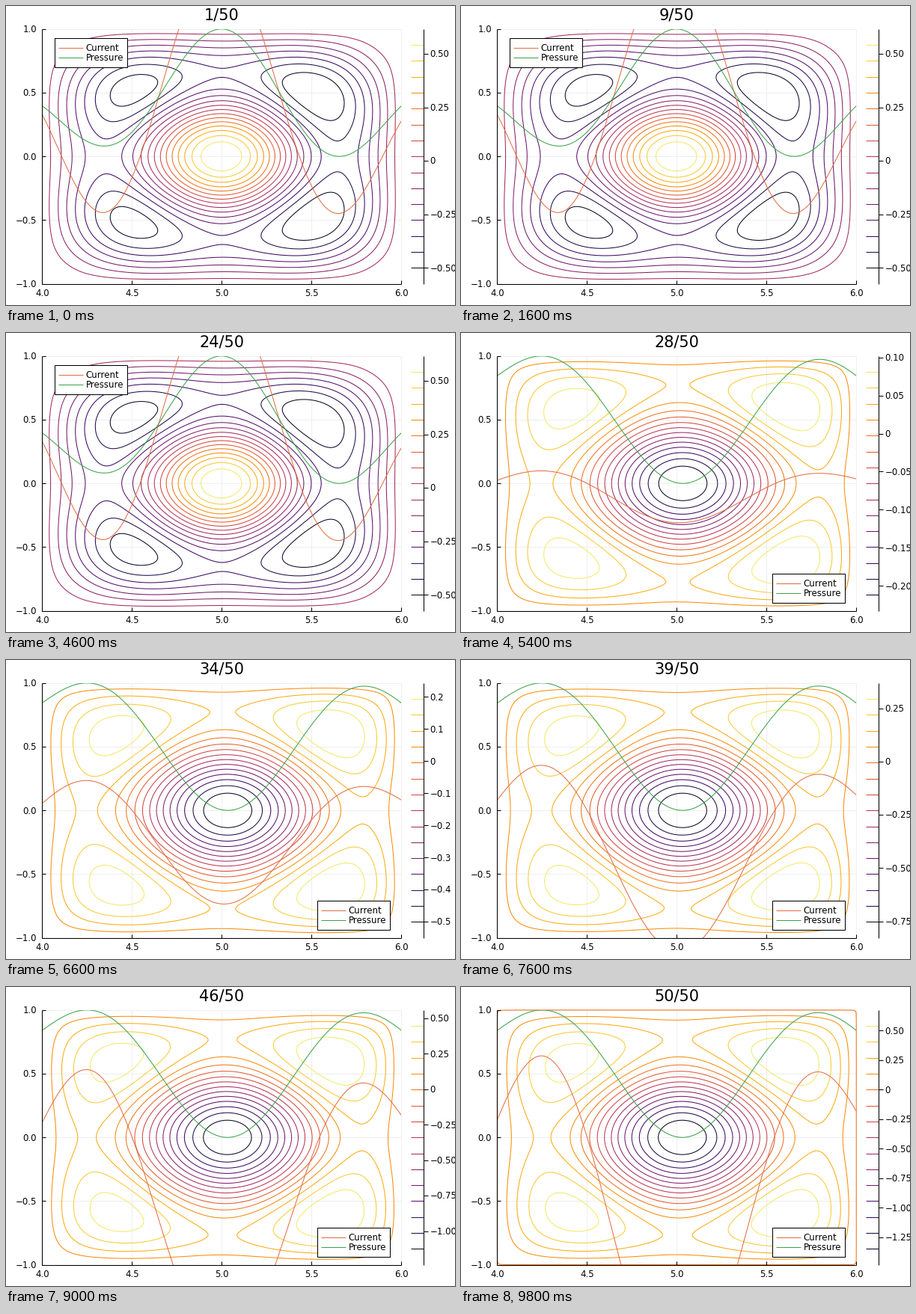
Write a matplotlib script that moves like this. It is 600x400 px and loops after 10 s.

```python
import math

import matplotlib.pyplot as plt
import numpy as np
from matplotlib.animation import FuncAnimation
from matplotlib.patches import Rectangle

FRAMES = 50
SWITCH = 25          # first step of the second equilibrium family
LEFT, RIGHT, TOP, BOTTOM = 48.3, 528.3, 30.8, 371.6
MID = (TOP + BOTTOM) / 2
HAIR = 0.75
SMALL, LARGE = 8.5, 15
ORANGE, GREEN = "#e26f46", "#3da44d"
LEVELS = 15
MU = 3.04

plt.rcParams["font.family"] = "DejaVu Sans"
fig = plt.figure(figsize=(6, 4), dpi=100, facecolor="white")
ax = fig.add_axes([0, 0, 1, 1])

R = np.linspace(4, 6, 161)
Z = np.linspace(-1, 1, 161)
H = R[1] - R[0]
INNER = R[1:-1]
ORDERS = np.arange(1, 40, 2)
WAVES = ORDERS * math.pi / 2
WEIGHTS = 4 / (ORDERS * math.pi) * np.sin(WAVES)
EYE = np.eye(len(INNER))
# psi'' - psi'/R on the inner grid points
BASE = (
    -2 / H**2 * EYE
    + np.diag(1 / H**2 - 1 / (2 * H * INNER[:-1]), 1)
    + np.diag(1 / H**2 + 1 / (2 * H * INNER[1:]), -1)
)


def px(r):
    return LEFT + (r - 4) / 2 * (RIGHT - LEFT)


def py(z):
    return MID - z * (BOTTOM - TOP) / 2


def parameters(step):
    """Eigenvalue and source profile of the linear Grad-Shafranov equation."""
    if step < SWITCH:
        return 31.02, 0.0535 * R**2 + 3.16
    return 22.3 + 0.0125 * (step - 34), 0.0039 * (step - 23.4) * R**2


def solve(lam, source):
    """Flux with zero boundary values, expanded in cosines along Z."""
    ops = BASE + (lam - WAVES**2)[:, None, None] * EYE
    rhs = -WEIGHTS[:, None] * source[1:-1]
    modes = np.linalg.solve(ops, rhs[..., None])[..., 0]
    psi = np.zeros((len(Z), len(R)))
    psi[1:-1, 1:-1] = (np.cos(np.outer(Z, WAVES)) @ modes)[1:-1]
    return psi


def nice_ticks(lo, hi):
    best, choice = -9, None
    for power in range(-4, 2):
        for base, nice in ((2.5, 0.501), (1, 1), (5, 0.9), (2, 0.7)):
            step = base * 10.0**power
            first, last = math.ceil(lo / step), math.floor(hi / step)
            count = last - first + 1
            if not 4 <= count <= 9:
                continue
            score = nice - abs(count - 5) / 5 - (count in (4, 9))
            if score > best:
                best, choice = score, (step, first, last)
    step, first, last = choice
    text = f"{step:.6f}".rstrip("0")
    digits = len(text.split(".")[1])
    return [(k * step, label(k * step, digits) if k else "0")
            for k in range(first, last + 1)]


def label(value, digits):
    return f"{value:.{digits}f}".replace("-", "\u2212")


def line(xs, ys, color="black", z=5, width=HAIR):
    return ax.plot(xs, ys, color=color, lw=width, zorder=z,
                   solid_capstyle="butt")[0]


def write(x, y, text, ha, size=SMALL):
    ax.text(x, y, text, ha=ha, va="baseline", fontsize=size,
            color="black", zorder=9)


def draw_axes():
    for r in (4, 4.5, 5, 5.5, 6):
        x = px(r)
        line([x, x], [TOP, BOTTOM], "#efefef", 1)
        line([x, x], [BOTTOM, BOTTOM - 5])
        write(x, 388, label(r, 1), "center")
    for z in (-1, -0.5, 0, 0.5, 1):
        y = py(z)
        line([LEFT, RIGHT], [y, y], "#efefef", 1)
        line([LEFT, LEFT + 5], [y, y])
        write(41, y + 4.3, label(z, 1), "right")
    line([LEFT, LEFT], [TOP, BOTTOM])
    line([LEFT, RIGHT], [BOTTOM, BOTTOM])


def draw_colorbar(levels, lo, hi):
    def at(v):
        return BOTTOM - (v - lo) / (hi - lo) * (BOTTOM - TOP)

    for v in levels:
        line([540.5, 558], [at(v)] * 2, plt.cm.inferno((v - lo) / (hi - lo)), 4)
    line([558.3, 558.3], [TOP, BOTTOM])
    for v, text in nice_ticks(lo, hi):
        line([558.3, 564], [at(v)] * 2)
        write(566.3, at(v) + 4.3, text, "left")


def draw_legend(x, y):
    ax.add_patch(Rectangle((x, y), 97, 39, fc="white", ec="black",
                           lw=HAIR, zorder=6))
    for k, (text, color) in enumerate((("Current", ORANGE),
                                       ("Pressure", GREEN))):
        row = y + 13.3 + 13 * k
        line([x + 5, x + 38], [row, row], color, 7)
        write(x + 42, row + 4.3, text, "left")


def draw(index):
    step = index + 1
    lam, source = parameters(step)
    psi = solve(lam, source)
    lo, hi = psi.min(), psi.max()
    levels = np.linspace(lo, hi, LEVELS + 2)[1:-1]
    mid = psi[len(Z) // 2]
    pressure = (mid - mid.min()) / (mid.max() - mid.min())
    current = (lam * mid + source) / (MU * R)

    ax.clear()
    ax.axis("off")
    draw_axes()
    ax.contour(px(R), py(Z), psi, levels=levels, cmap="inferno", vmin=lo,
               vmax=hi, linewidths=HAIR, linestyles="solid", zorder=3)
    frame = Rectangle((LEFT, TOP), RIGHT - LEFT, BOTTOM - TOP,
                      transform=ax.transData)
    for values, color in ((current, ORANGE), (pressure, GREEN)):
        line(px(R), py(values), color, 4).set_clip_path(frame)
    draw_colorbar(levels, lo, hi)
    draw_legend(*((64.5, 42.5) if step < SWITCH else (415.5, 321.5)))
    write(288.3, 18.5, f"{step}/{FRAMES}", "center", LARGE)
    ax.set_xlim(0, 600)
    ax.set_ylim(400, 0)
    return []


anim = FuncAnimation(fig, draw, frames=FRAMES, interval=200,
                     init_func=lambda: [], repeat=True, repeat_delay=0)
plt.show()
```
